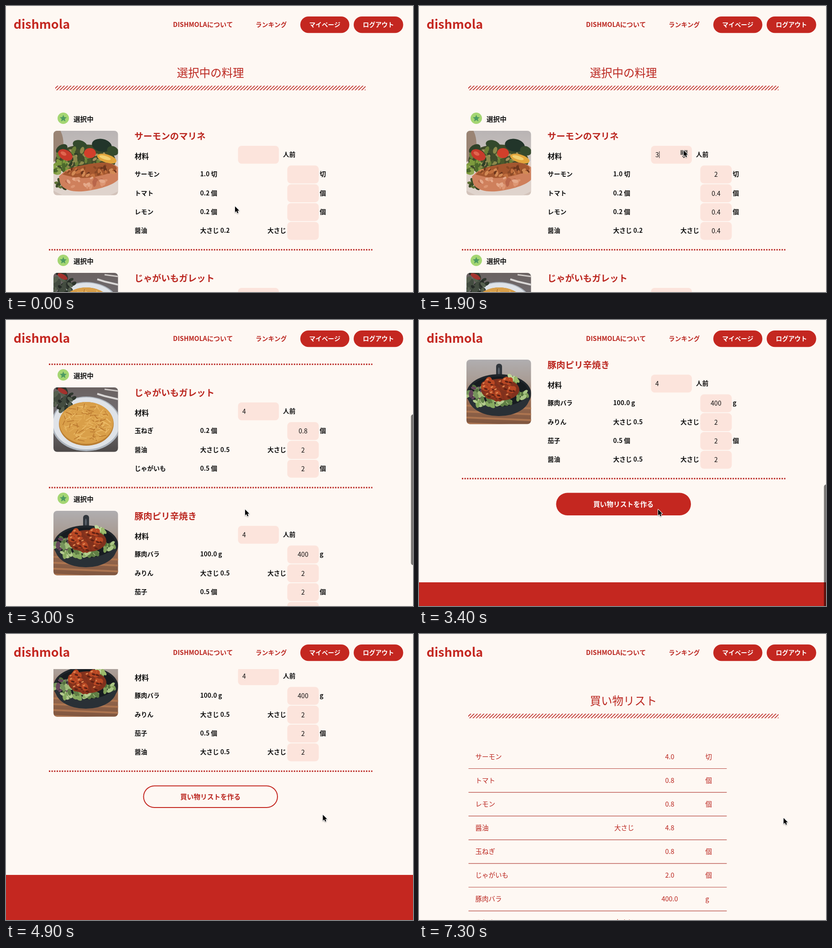
An HTML page with a canvas for the animation above (7400 ms loop, 892 by 628 pixels).

```html
<!DOCTYPE html>
<html lang="ja">
<head>
<meta charset="utf-8">
<title>選択中の料理</title>
<style>
html, body { margin: 0; width: 100%; height: 100%; overflow: hidden; background: #fef8f3; }
canvas { display: block; }
</style>
</head>
<body>
<canvas id="stage" width="892" height="628"></canvas>
<script>
const ctx = document.getElementById('stage').getContext('2d');
const W = 892, H = 628, LOOP = 7400;
const RED = '#c42720', TEXT_RED = '#bb2720', PAPER = '#fef8f3', BLUSH = '#fce4dc', INK = '#111';
const FONT = '"Noto Sans CJK JP", "Noto Sans CJK", "Noto Sans", sans-serif';
const BRAND = 'dishmola';
const SWITCH = 5200, ROW = 41.3, PHOTO = 141.5, STRIPE = 7.19;
const CLICKS = [1150, 1450, 1850, 2150];

// rows: name, amount per person, unit, unit stands in front
const recipes = [
  { title: 'サーモンのマリネ', top: 274, photo: salmon, rows: [
    ['サーモン', 1, '切'], ['トマト', 0.2, '個'], ['レモン', 0.2, '個'], ['醤油', 0.2, '大さじ', true]] },
  { title: 'じゃがいもガレット', top: 586, photo: galette, rows: [
    ['玉ねぎ', 0.2, '個'], ['醤油', 0.5, '大さじ', true], ['じゃがいも', 0.5, '個']] },
  { title: '豚肉ピリ辛焼き', top: 857, photo: skillet, rows: [
    ['豚肉バラ', 100, 'g'], ['みりん', 0.5, '大さじ', true], ['茄子', 0.5, '個'], ['醤油', 0.5, '大さじ', true]] }
];

const shopping = new Map();
for (const [name, amount, unit, before] of recipes.flatMap(r => r.rows)) {
  const item = shopping.get(name) || { sum: 0, unit, before };
  item.sum += amount * 4;
  shopping.set(name, item);
}

// time, x, y
const cursorKeys = [[300, 502, 440], [1000, 580, 317], [2300, 580, 317], [2550, 524, 416],
  [3800, 524, 416], [4100, 506, 360], [4400, 506, 360], [4900, 694.5, 397],
  [5400, 801, 404], [6900, 801, 404], [7300, 799, 404]];
const scrollKeys = [[2500, 0], [2700, 125], [3000, 438], [3200, 612], [3400, 770], [3600, 810], [3800, 817]];

const linear = p => p;
const smooth = p => p * p * (3 - 2 * p);

function track(keys, t, col, ease) {
  if (t <= keys[0][0]) return keys[0][col];
  for (let i = 1; i < keys.length; i++) {
    const a = keys[i - 1], b = keys[i];
    if (t <= b[0]) return a[col] + (b[col] - a[col]) * ease((t - a[0]) / (b[0] - a[0]));
  }
  return keys[keys.length - 1][col];
}

function random(seed) {
  return () => (seed = (seed * 16807) % 2147483647) / 2147483647;
}

// y is the middle of the glyphs
function text(s, x, y, size, { color = INK, weight = 700, align = 'left' } = {}) {
  ctx.font = `${weight} ${size}px ${FONT}`;
  ctx.textAlign = align;
  ctx.fillStyle = color;
  ctx.fillText(s, x, y + size * 0.38);
}

function box(x, y, w, h, r, color) {
  ctx.beginPath();
  ctx.roundRect(x, y, w, h, r);
  ctx.fillStyle = color;
  ctx.fill();
}

function oval(x, y, rx, ry, color, turn = 0) {
  ctx.beginPath();
  ctx.ellipse(x, y, rx, ry, turn, 0, Math.PI * 2);
  ctx.fillStyle = color;
  ctx.fill();
}

function line(points, color, width) {
  ctx.beginPath();
  points.forEach(([x, y]) => ctx.lineTo(x, y));
  ctx.strokeStyle = color;
  ctx.lineWidth = width;
  ctx.stroke();
}

function blob(points, color) {
  ctx.beginPath();
  points.forEach(([x, y], i) => {
    const [nx, ny] = points[(i + 1) % points.length];
    ctx.quadraticCurveTo(x, y, (x + nx) / 2, (y + ny) / 2);
  });
  ctx.fillStyle = color;
  ctx.fill();
}

// strews small leaves or crumbs over an oval area
function strew(seed, count, x, y, rx, ry, size, colors) {
  const rnd = random(seed);
  for (let i = 0; i < count; i++) {
    const a = rnd() * 6.28, d = Math.sqrt(rnd()), s = size * (0.6 + rnd() * 0.6);
    oval(x + Math.cos(a) * d * rx, y + Math.sin(a) * d * ry, s, s * 0.55, colors[i % colors.length], rnd() * 3);
  }
}

function backdrop(...colors) {
  const g = ctx.createLinearGradient(0, 0, 0, PHOTO);
  colors.forEach((c, i) => g.addColorStop(i / (colors.length - 1), c));
  ctx.fillStyle = g;
  ctx.fillRect(0, 0, 142, 142);
}

function salmon() {
  backdrop('#b9b4b4', '#cbc4c0', '#d3c3ba');
  oval(2, 30, 20, 40, '#9a8474');
  oval(72, 100, 92, 50, '#dfd3cc');
  oval(70, 66, 66, 36, '#3f4b2b');
  oval(58, 31, 16, 10, '#33492c', 0.3);
  oval(106, 32, 22, 14, '#22352a', 0.2);
  oval(18, 40, 14, 9, '#2f4229', -0.6);
  oval(130, 44, 13, 10, '#344a2c', 0.4);
  strew(23, 60, 62, 66, 58, 26, 7, ['#6b8038', '#2f3f26', '#8c8a4c', '#49592c', '#a3905e']);
  strew(9, 26, 18, 84, 18, 18, 7, ['#7d9a3d', '#4c692c', '#90a852']);
  strew(31, 14, 22, 116, 16, 14, 7, ['#3c4b27', '#5e7035', '#2c3722']);
  oval(26, 53, 17, 11, '#c73a2b', 0.5);
  oval(22, 50, 7, 4, '#e0664f', 0.5);
  oval(80, 49, 13, 11, '#d23f2b');
  oval(117, 61, 22, 9, '#e3a63c', 0.3);
  oval(113, 59, 13, 4, '#f2cf70', 0.3);
  blob([[12, 100], [30, 84], [78, 74], [122, 68], [150, 84], [146, 108], [110, 126], [50, 136], [16, 124]], '#cf805c');
  blob([[20, 96], [34, 82], [80, 72], [120, 68], [146, 84], [110, 98], [60, 106]], '#a4572f');
  strew(53, 36, 82, 89, 54, 11, 6, ['#6d361d', '#c2703f', '#8a4825', '#d28a55']);
  strew(71, 26, 76, 114, 52, 11, 6, ['#dd9673', '#b9664a', '#e5a98a']);
}

function galette() {
  backdrop('#6a6261', '#737075', '#4e4a49');
  oval(72, 80, 76, 60, '#aeb6bf');
  oval(72, 79, 73, 57, '#dfe3e8');
  strew(15, 34, 20, 24, 24, 28, 9, ['#2f372e', '#434c40', '#252a26', '#56604f']);
  oval(20, 8, 12, 5, '#a3322d', 0.5);
  line([[142, 26], [112, 19], [96, 14]], '#d9d7d6', 4);
  line([[142, 8], [112, 4]], '#cfcac7', 3);
  oval(72, 80, 60, 48, '#b97d31');
  oval(72, 78, 59, 46, '#d99f49');
  const rnd = random(41);
  for (let i = 0; i < 130; i++) {
    const a = rnd() * 6.28, d = Math.sqrt(rnd()) * 0.88, turn = rnd() * 3.14;
    const x = 72 + Math.cos(a) * d * 59, y = 78 + Math.sin(a) * d * 46;
    const dx = Math.cos(turn) * 8, dy = Math.sin(turn) * 5;
    line([[x - dx, y - dy], [x + dx, y + dy]], ['#edbd6a', '#b8752d', '#e4ae58'][i % 3], 1.5);
  }
}

function skillet() {
  backdrop('#b0aeb0', '#a99c94', '#96694f', '#80563f');
  for (let y = 101; y < 142; y += 13) line([[0, y], [142, y + 6]], '#ad7550', 4);
  box(65, 9, 13, 36, 6, '#30363c');
  oval(71, 25, 2, 8, '#59616a');
  oval(71, 75, 71, 43, '#20262b');
  oval(71, 83, 67, 41, '#293036');
  oval(71, 70, 64, 33, '#171c20');
  strew(19, 34, 24, 76, 20, 18, 8, ['#75935b', '#a3bd7b', '#54703f', '#64445a']);
  strew(37, 32, 56, 93, 38, 9, 8, ['#87aa60', '#b4cb8d', '#5f7f45']);
  strew(11, 16, 99, 46, 14, 9, 7, ['#9cbb6c', '#c0d69a', '#6c8f4a']);
  strew(29, 14, 120, 77, 12, 10, 7, ['#7d9f58', '#a9c584', '#516f3c']);
  oval(74, 66, 42, 24, '#80311d');
  const rnd = random(17);
  for (let i = 0; i < 22; i++) {
    const x = 40 + rnd() * 68, y = 45 + rnd() * 40;
    oval(x, y, 9, 7, i % 2 ? '#b94824' : '#8c341c', rnd() * 3);
    oval(x + 2, y + 3, 4, 2, '#5e2114', 0.3);
    oval(x - 2, y - 3, 3, 1.5, '#e28a53', -0.4);
  }
}

function badge(y) {
  oval(125.5, y, 12.5, 12.5, '#a5d673');
  ctx.beginPath();
  for (let i = 0; i < 10; i++) {
    const a = -Math.PI / 2 + i * Math.PI / 5, r = i % 2 ? 3.6 : 8;
    ctx.lineTo(125.5 + Math.cos(a) * r, y + 0.5 + Math.sin(a) * r);
  }
  ctx.fillStyle = '#4d9a62';
  ctx.fill();
  text('選択中', 148, y + 1.5, 14.6);
}

function dots(y) {
  ctx.setLineDash([3, 2.65]);
  line([[94, y], [803, y]], '#b8231f', 3);
  ctx.setLineDash([]);
}

function recipe(r, people, portions) {
  const y = r.top;
  badge(y - 27.5);
  ctx.save();
  ctx.translate(104, y);
  ctx.beginPath();
  ctx.roundRect(0, 0, PHOTO, PHOTO, 8);
  ctx.clip();
  r.photo();
  ctx.restore();
  text(r.title, 281.5, y + 12, 19.5, { color: TEXT_RED });
  text('材料', 282, y + 56.5, 15.6);
  box(508.5, y + 33, 89.5, 39.3, 8, BLUSH);
  if (people) text(people, 518, y + 52.5, 14, { weight: 400 });
  text('人前', 607, y + 52, 13.7);
  r.rows.forEach(([name, amount, unit, before], i) => {
    const mid = y + 95 + i * ROW, fixed = amount.toFixed(1);
    text(name, 282, mid, 13.7);
    text(before ? `${unit} ${fixed}` : `${fixed} ${unit}`, 425.5, mid, 13.7);
    box(616.5, mid - 18.7, 69, 39.3, 8, BLUSH);
    if (portions) text(+(amount * portions).toFixed(1), 651, mid + 1, 14, { weight: 400, align: 'center' });
    text(unit, before ? 573 : 687.5, mid, 13.7);
  });
  dots(y + 96 + r.rows.length * ROW);
}

function heading(s) {
  text(s, 448, 146.5, 24.5, { color: TEXT_RED, weight: 400, align: 'center' });
  ctx.save();
  ctx.beginPath();
  ctx.rect(108, 175, 680, 10);
  ctx.clip();
  // the stripes are counted from the lower right corner
  for (let x = 786.8; x > 96; x -= STRIPE) line([[x - 1, 186], [x + 11, 174]], TEXT_RED, 1.6);
  ctx.restore();
}

function spinner() {
  box(573, 316.5, 15.5, 10.5, 0, '#77716e');
  line([[577, 324], [580.5, 320], [584, 324]], '#444', 1.5);
  line([[577, 329], [580.5, 333], [584, 329]], '#55504e', 1.5);
}

function recipePage(t, mx, my) {
  const scroll = track(scrollKeys, t, 1, linear);
  const clicked = delay => CLICKS.filter(c => c + delay <= t).length;
  const people = clicked(0), portions = clicked(200);
  ctx.save();
  ctx.translate(0, -scroll);
  heading('選択中の料理');
  recipes.forEach(r => recipe(r, people, portions));
  const y = my + scroll;
  if (people) box(518 + 8.3, 319, 1, 15, 0, '#222');
  if (mx > 508 && mx < 598 && y > 307 && y < 346) spinner();

  const over = mx > 301 && mx < 596 && y > 1149 && y < 1199;
  box(300.5, 1149.5, 295.5, 49.5, 24.7, RED);
  if (!over) box(302.5, 1151.5, 291.5, 45.5, 22.7, PAPER);
  text('買い物リストを作る', 448, 1174, 14.7, { color: over ? '#fff' : TEXT_RED, align: 'center' });
  ctx.fillStyle = RED;
  ctx.fillRect(0, 1346, W, 300);
  ctx.restore();
  return scroll;
}

function listPage() {
  heading('買い物リスト');
  let y = 269;
  const style = { color: TEXT_RED, weight: 400 };
  for (const [name, { sum, unit, before }] of shopping) {
    text(name, 123.5, y, 14.5, style);
    text(sum.toFixed(1), 549.5, y, 14.5, { ...style, align: 'center' });
    text(unit, before ? 428 : 627.5, y, 14.5, style);
    line([[108.5, y + 26.5], [674.5, y + 26.5]], '#b4463f', 1.2);
    y += 52.1;
  }
}

function header() {
  ctx.fillStyle = PAPER;
  ctx.fillRect(0, 0, W, 77);
  text(BRAND, 16.5, 39.5, 27, { color: RED });
  text(BRAND.toUpperCase() + 'について', 366, 40.5, 14.2, { color: TEXT_RED });
  text('ランキング', 547, 40.5, 13.7, { color: TEXT_RED });
  [['マイページ', 645, 107.5], ['ログアウト', 762, 108.5]].forEach(([label, x, w]) => {
    box(x, 23, w, 36.3, 18, RED);
    text(label, x + w / 2, 40.5, 13.7, { color: '#fff', align: 'center' });
  });
}

function scrollbar(t, scroll) {
  if (t < 2500) return;
  ctx.globalAlpha = Math.max(0, Math.min(1, (4600 - t) / 300));
  box(887.5, 4 + scroll * 0.464, 10, 331, 5, 'rgba(0,0,0,.52)');
  ctx.globalAlpha = 1;
}

function pointer(x, y) {
  const shape = [[0, 0], [0, 13], [3, 10.3], [5, 15], [7.2, 14], [5.3, 9.6], [9.2, 9.3]];
  ctx.save();
  ctx.translate(x, y);
  ctx.beginPath();
  shape.forEach(([px, py]) => ctx.lineTo(px, py));
  ctx.closePath();
  ctx.lineJoin = 'round';
  ctx.shadowColor = 'rgba(0,0,0,.35)';
  ctx.shadowBlur = 2;
  ctx.shadowOffsetY = 1;
  ctx.strokeStyle = '#fff';
  ctx.lineWidth = 2;
  ctx.stroke();
  ctx.shadowColor = 'transparent';
  ctx.fillStyle = '#000';
  ctx.fill();
  ctx.restore();
}

function frame(now) {
  const t = Math.floor((now % LOOP) / 100) * 100;
  const mx = track(cursorKeys, t, 1, smooth), my = track(cursorKeys, t, 2, smooth);
  ctx.fillStyle = PAPER;
  ctx.fillRect(0, 0, W, H);
  if (t < SWITCH) {
    const scroll = recipePage(t, mx, my);
    header();
    scrollbar(t, scroll);
  } else {
    listPage();
    header();
  }
  pointer(mx, my);
}

let start;
function tick(now) {
  start ??= now;
  frame(now - start);
  requestAnimationFrame(tick);
}
frame(0);
requestAnimationFrame(tick);
</script>
</body>
</html>
```
